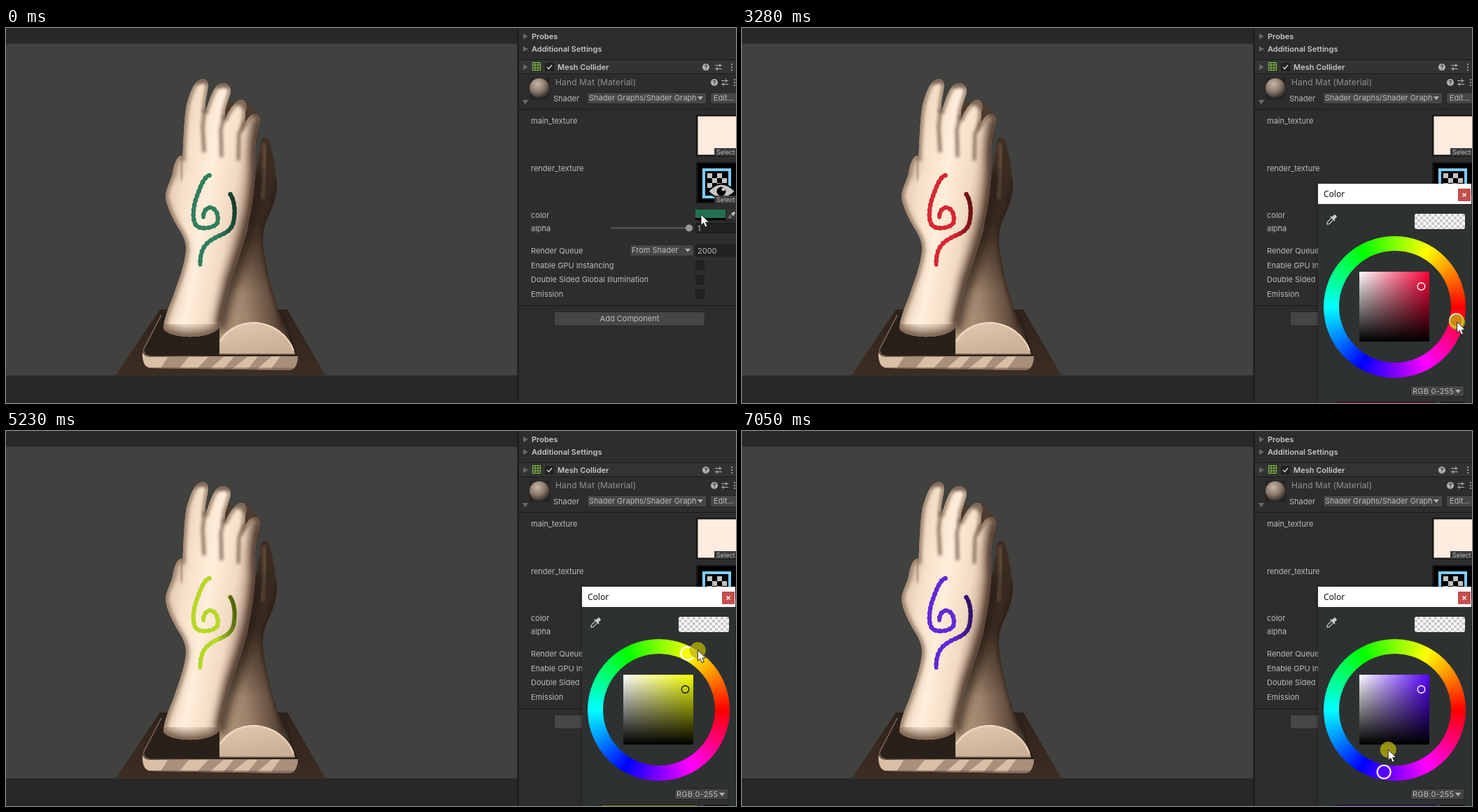
Recreate the animation shown at these times as an HTML page. Size 1043x537 px, loop 8000 ms.

```html
<!DOCTYPE html>
<html lang="en">
<head>
<meta charset="utf-8">
<title>Material colour picker</title>
<style>
html, body { margin: 0; width: 100%; height: 100%; overflow: hidden; background: #282828; }
body { position: relative; }
svg { position: absolute; left: 0; top: 0; display: block; }
text { font: 11px Inter, Roboto, sans-serif; fill: #bcbcbc; white-space: pre; }
.bold { font-weight: 600; fill: #c6c6c6; }
.small { font-size: 9px; }
.field { fill: #222; stroke: #191919; }
.drop { fill: #464646; stroke: #262626; }
.icon { fill: none; stroke: #b4b4b4; stroke-width: 1.2; }
#pop { position: absolute; left: 0; top: 0; width: 1043px; height: 537px; transform-origin: 933px 380px; }
#pop div { position: absolute; }
.panel { left: 823px; top: 223px; width: 219px; height: 330px; background: #2e3131; box-shadow: 0 1px 7px rgba(0,0,0,.3); }
.title { left: 823px; top: 223px; width: 219px; height: 29px; background: #fff; }
.wheel { left: 831px; top: 297.5px; width: 203px; height: 203px; border-radius: 50%;
  background: conic-gradient(from 90deg, #f00, #f0f, #00f, #0ff, #0f0, #ff0, #f00); }
.hole { left: 852.5px; top: 319px; width: 160px; height: 160px; border-radius: 50%; background: #2e3131; }
.square { left: 882px; top: 349px; width: 100px; height: 100px;
  background: linear-gradient(to top, #000, rgba(0,0,0,0)), linear-gradient(to right, #fff, rgba(255,255,255,0)), var(--hue); }
.swatch { left: 961px; top: 266px; width: 72px; height: 22px; border-radius: 3px;
  background: repeating-conic-gradient(#c9c9c9 0 25%, #fff 0 50%) 0 0 / 8px 8px; }
</style>
</head>
<body>
<svg width="1043" height="537" viewBox="0 0 1043 537">
  <defs>
    <path id="front" d="M249 183C243 186 240 196 238 208C236 218 229 228 228 240C229 256 238 272 246 286C253 297 258 306 257 320C255 340 247 360 241 378C235 396 226 412 225 430C228 438 248 443 268 442C286 441 300 436 306 428C306 410 314 385 322 358C329 334 340 310 345 285C351 258 355 235 356 205C355 185 356 165 358 152C361 142 364 134 362 128C359 122 351 123 347 128L341 136L342 120C345 112 343 105 338 103C332 102 327 108 322 114C318 120 315 126 312 132L313 118C316 106 321 96 321 88C319 80 312 78 306 80C298 83 295 92 291 102L284 122L285 108C286 96 290 86 288 78C286 72 279 72 274 76C266 82 262 96 258 110C255 125 254 150 253 170L252 190C253 185 251 182 249 183Z"/>
    <path id="back" d="M364 163C366 156 373 156 376 162C381 175 384 200 387 220C388 240 381 256 374 272C366 290 366 305 369 325C373 350 380 375 388 402C394 415 408 445 413 467H305V430C310 390 330 340 345 290L356 210C360 195 360 185 363 176Z"/>
    <path id="side" d="M195 464Q194 486 207 487L404 490Q416 490 417 470L205 471Q197 470 195 464Z"/>
    <clipPath id="inFront"><use href="#front"/></clipPath>
    <clipPath id="inBack"><use href="#back"/></clipPath>
    <clipPath id="inSide"><use href="#side"/></clipPath>
    <filter id="soft" x="-50%" y="-50%" width="200%" height="200%"><feGaussianBlur stdDeviation="6"/></filter>
    <filter id="fine" x="-50%" y="-50%" width="200%" height="200%"><feGaussianBlur stdDeviation="2"/></filter>
    <linearGradient id="skin" gradientUnits="userSpaceOnUse" x1="228" x2="356" y1="240" y2="262">
      <stop stop-color="#e3cab2"/><stop offset=".2" stop-color="#f7e1cb"/><stop offset=".45" stop-color="#ffeeda"/>
      <stop offset=".72" stop-color="#f2dac3"/><stop offset="1" stop-color="#b0937b"/>
    </linearGradient>
    <linearGradient id="arm" gradientUnits="userSpaceOnUse" x1="305" x2="396" y1="400" y2="388">
      <stop stop-color="#b5997f"/><stop offset=".4" stop-color="#9f846d"/><stop offset=".75" stop-color="#6c5544"/><stop offset="1" stop-color="#3f3026"/>
    </linearGradient>
    <linearGradient id="dusk" x2="0" y2="1">
      <stop stop-color="#3c2d22" stop-opacity=".85"/><stop offset=".4" stop-color="#35271d" stop-opacity=".85"/><stop offset=".72" stop-color="#35271d" stop-opacity="0"/>
    </linearGradient>
    <linearGradient id="face" x2=".4" y2="1"><stop stop-color="#e3c9b1"/><stop offset="1" stop-color="#cbb097"/></linearGradient>
    <linearGradient id="plinth" x2="0" y2="1"><stop stop-color="#2f231c"/><stop offset="1" stop-color="#3d2d23"/></linearGradient>
    <linearGradient id="dim" gradientUnits="userSpaceOnUse" x1="296" x2="330" y1="270" y2="264">
      <stop stop-opacity="0"/><stop offset="1" stop-opacity=".34"/>
    </linearGradient>
    <radialGradient id="ball" cx=".4" cy=".3" r=".75"><stop stop-color="#c9b5a4"/><stop offset=".5" stop-color="#8e7d70"/><stop offset="1" stop-color="#2c2622"/></radialGradient>
    <g id="tools">
      <circle r="5" fill="#b4b4b4"/><path d="M-1.6-1.4Q-1.4-3 0-3T1.6-1.4Q1.5-.6 0 .4V1M0 2.2V3.2" fill="none" stroke="#2d2d2d" stroke-width="1.2"/>
    </g>
    <path id="sliders" class="icon" d="M-5-2.5H5M-5 2.5H5M2-5V0M-2 0V5"/>
    <path id="dots" d="M0-4v.1M0 0v.1M0 4v.1" stroke="#c4c4c4" stroke-width="2" stroke-linecap="round"/>
    <path id="fold" d="M-3-4L4 0L-3 4Z" fill="#696969"/>
    <path id="caret" d="M-4-2H4L0 3Z" fill="#b0b0b0"/>
    <g id="dropper" transform="rotate(45)">
      <path d="M-2.6-9Q0-11 2.6-9V-4H4.5V-1.8H-4.5V-4H-2.6Z" fill="#c8cccc"/><path d="M-2-1V6L0 9L2 6V-1" fill="none" stroke="#c8cccc" stroke-width="1.3"/>
    </g>
  </defs>

  <rect width="731" height="537" fill="#282828"/>
  <rect y="22.500" width="731" height="475" fill="#41413f"/>

  <!-- stand -->
  <path d="M220 403H402L456 497H157Z" fill="url(#plinth)"/>
  <path d="M222 410Q224 406 232 406H388Q395 406 398 412L417 470H205Q194 469 196 462Z" fill="#2a201a"/>
  <path d="M222 411L197 459Q195 469 206 470L416 471" fill="none" stroke="#8e7765" stroke-width="1.2"/>
  <use href="#side" fill="#d9bfa6"/>
  <g clip-path="url(#inSide)">
    <path d="M232 470L220 489H246L262 470ZM290 470L272 489H290L312 470ZM326 470L310 489H322L346 470ZM360 470L345 489H358L380 470ZM392 470L378 489H420V470Z" fill="#846b59" opacity=".55"/>
    <path d="M195 488L418 491" stroke="#5d4a3c" stroke-width="5" filter="url(#fine)"/>
  </g>

  <!-- far hand -->
  <path d="M306 110Q314 101 328 109L342 103L363 128L358 165L318 160Z" fill="#4d3b2e"/>
  <use href="#back" fill="url(#arm)"/>
  <g clip-path="url(#inBack)">
    <rect x="300" y="155" width="115" height="312" fill="url(#dusk)"/>
    <path d="M368 165C372 185 368 225 366 245" fill="none" stroke="#80664f" stroke-width="6" opacity=".55" filter="url(#fine)"/>
    <path d="M358 205C354 255 340 310 325 355Q310 395 305 432" fill="none" stroke="#241911" stroke-width="18" opacity=".65" filter="url(#soft)"/>
    <path d="M387 220Q384 255 369 282Q364 310 380 370L398 428" fill="none" stroke="#2b1f17" stroke-width="7" opacity=".65" filter="url(#fine)"/>
  </g>
  <path d="M305 467V447C315 430 335 421 355 421C385 423 405 440 413 467Z" fill="url(#face)"/>
  <path d="M306 449C317 431 336 422 355 422C383 424 403 440 411 462" fill="none" stroke="#f0d9c3" stroke-width="2"/>
  <path d="M305 467H413" stroke="#806957" stroke-width="1.500"/>

  <!-- near hand -->
  <use href="#front" fill="url(#skin)"/>
  <g clip-path="url(#inFront)" fill="none">
    <use href="#front" stroke="#806550" stroke-width="9" opacity=".65" filter="url(#fine)"/>
    <path d="M362 128Q354 165 357 205Q354 255 345 285Q337 318 322 358L306 428" stroke="#3f2c20" stroke-width="19" opacity=".75" filter="url(#soft)"/>
    <path d="M249 183Q248 202 239 215M226 245Q242 290 257 312Q255 350 226 428" stroke="#9a7c65" stroke-width="10" opacity=".4" filter="url(#soft)"/>
    <path d="M284 116L281 140L283 178M312 125L307 146L308 185M341 134L333 152L332 190" stroke="#6e5543" stroke-width="5" opacity=".75" filter="url(#fine)"/>
    <path d="M268 74H290M300 80H324M329 102L364 127" stroke="#604a3b" stroke-width="12" opacity=".6" filter="url(#fine)"/>
    <path d="M252 180L250 218" stroke="#8d715b" stroke-width="4" opacity=".6" filter="url(#fine)"/>
    <path d="M222 431Q264 450 310 430" stroke="#674f3e" stroke-width="21" opacity=".65" filter="url(#soft)"/>
  </g>
  <g id="swirl" fill="none" stroke-linecap="round" stroke-linejoin="round">
    <path id="curl" d="M290.500 211C282 213 276 232 271 246C267 260 266 276 272 283C279 289 297 287 302 279C305 267 299 257 291 257C284 259 282 264 282 271" stroke-width="5.600"/>
    <path id="tail" d="M320.500 238C327 248 328 264 325 278C321 294 307 295 296 302C283 309 277 320 277.500 339" stroke-width="5.600"/>
    <use href="#curl" stroke-dasharray="0 7" style="stroke-width:6.600px"/>
    <path d="M290.500 211C282 213 276 232 271 246C267 260 266 276 272 283C279 289 297 287 302 279C305 267 299 257 291 257C284 259 282 264 282 271M320.500 238C327 248 328 264 325 278C321 294 307 295 296 302C283 309 277 320 277.500 339" stroke-width="6.700" stroke-dasharray="0 7"/>
    <use href="#tail" stroke="url(#dim)"/>
    <path d="M320.500 238C327 248 328 264 325 278C321 294 307 295 296 302" stroke="url(#dim)" stroke-width="6"/>
  </g>

  <!-- inspector -->
  <rect x="731" width="312" height="537" fill="#2d2d2d"/>
  <rect x="730.500" width="2" height="537" fill="#191919"/>
  <rect x="733" y="46" width="310" height="19" fill="#333"/>
  <path d="M733 45.500H1043M733 65.500H1043M733 116.500H1043M733 397.500H1043" stroke="#1b1b1b"/>
  <use href="#fold" x="742" y="12"/><use href="#fold" x="742" y="30"/><use href="#fold" x="742" y="56"/>
  <use href="#fold" transform="translate(742 106) rotate(90)"/>
  <text class="bold" x="751" y="16">Probes</text>
  <text class="bold" x="751" y="34">Additional Settings</text>
  <path d="M752.500 49.500H763.500V60.500H752.500ZM756 49.500V60.500M760 49.500V60.500M752.500 53H763.500M752.500 57H763.500" fill="none" stroke="#82c83c"/>
  <rect class="field" x="770.500" y="50.500" width="12" height="11" rx="2"/>
  <path d="M773 56L775.500 58.500L780 53" fill="none" stroke="#d0d0d0" stroke-width="1.500"/>
  <text class="bold" x="788" y="60">Mesh Collider</text>
  <use href="#tools" x="1000" y="56"/><use href="#sliders" x="1018" y="56"/><use href="#dots" x="1037" y="56"/>
  <use href="#tools" x="1012" y="78"/><use href="#sliders" x="1027" y="78"/><use href="#dots" x="1041" y="78"/>
  <rect x="748" y="71" width="29" height="31" fill="#262626"/>
  <circle cx="762" cy="86" r="14" fill="url(#ball)"/>
  <text x="785" y="82" style="font-size:12px;fill:#929292;letter-spacing:.13px">Hand Mat (Material)</text>
  <text x="782" y="105">Shader</text>
  <rect class="drop" x="830.500" y="92.500" width="170" height="16" rx="2"/>
  <text x="833" y="104">Shader Graphs/Shader Graph</text><use href="#caret" x="992" y="100"/>
  <rect class="drop" x="1006.500" y="92.500" width="40" height="16" rx="2"/><text x="1011" y="104">Edit...</text>

  <text x="750" y="137">main_texture</text>
  <rect x="986" y="124" width="57" height="60" fill="#171717"/><rect x="988.500" y="126.500" width="55" height="55" fill="#fdecdf"/>
  <text x="750" y="205">render_texture</text>
  <rect x="986" y="192" width="57" height="59" fill="#161616"/><rect x="988.500" y="194" width="55" height="55" fill="#000"/>
  <rect x="997" y="203" width="37" height="39" fill="none" stroke="#7fcdf5" stroke-width="4"/>
  <path d="M1002 208h7v7h-7zM1016 208h7v7h-7zM1009 215h7v7h-7zM1023 215h7v7h-7zM1002 222h7v7h-7zM1016 222h7v7h-7z" fill="#c4c4c4"/>
  <path d="M1003 234Q1022 213 1042 234Q1022 253 1003 234Z" fill="#c4c4c4" stroke="#000" stroke-width="2"/>
  <circle cx="1022" cy="234" r="6.500" fill="#000"/><circle cx="1025" cy="231" r="2.500" fill="#c4c4c4"/>
  <path d="M1012 172h31v11h-31zM1012 240h31v11h-31z" fill="#3b3b3b"/>
  <text class="small" x="1015" y="181">Select</text><text class="small" x="1015" y="249">Select</text>

  <text x="750" y="272">color</text>
  <rect x="985" y="260" width="58" height="16" fill="#1d1d1d"/><rect x="985" y="260" width="43" height="12" fill="#217150"/><rect x="985" y="272" width="43" height="3" fill="#000"/>
  <rect x="1029" y="260" width="14" height="15" fill="#333"/><use href="#dropper" transform="translate(1037 268) scale(.6)"/>
  <text x="750" y="291">alpha</text>
  <path d="M864 286.500H976" stroke="#5e5e5e" stroke-width="2"/><circle cx="976" cy="286.500" r="5" fill="#999"/>
  <rect class="field" x="985.500" y="279.500" width="60" height="14" rx="2"/><text x="988" y="291">1</text>
  <text x="750" y="323">Render Queue</text>
  <rect class="drop" x="891.500" y="310.500" width="91" height="16" rx="2"/><text x="894" y="322">From Shader</text><use href="#caret" x="974" y="318"/>
  <rect class="field" x="985.500" y="310.500" width="60" height="16" rx="2"/><text x="988" y="323">2000</text>
  <text x="750" y="344">Enable GPU Instancing</text>
  <text x="750" y="364">Double Sided Global Illumination</text>
  <text x="750" y="385">Emission</text>
  <rect class="field" x="985.500" y="333.500" width="12" height="12" rx="2"/><rect class="field" x="985.500" y="354.500" width="12" height="12" rx="2"/><rect class="field" x="985.500" y="374.500" width="12" height="12" rx="2"/>
  <rect class="drop" x="783.500" y="406.500" width="215" height="20" rx="2"/><text x="891" y="420" text-anchor="middle">Add Component</text>
</svg>

<div id="pop">
  <div class="panel"></div><div class="title"></div>
  <div class="wheel"></div><div class="hole"></div><div class="square"></div><div class="swatch"></div>
  <svg width="1043" height="537" viewBox="0 0 1043 537">
    <text x="831" y="242" style="font:12px 'Noto Sans','Open Sans',sans-serif;fill:#111">Color</text>
    <rect x="1023" y="230" width="18" height="18" fill="#c64e4e"/>
    <path d="M1029.500 236.500L1034.500 241.500M1034.500 236.500L1029.500 241.500" stroke="#fff" stroke-width="1.400"/>
    <use href="#dropper" transform="translate(842 275) scale(.95)"/>
    <rect class="drop" x="955.500" y="512.500" width="76" height="15" rx="2"/>
    <text x="958" y="524" style="letter-spacing:.25px">RGB 0-255</text><use href="#caret" x="1023" y="520"/>
    <rect x="848" y="535" width="142" height="2" fill="#151515"/><rect id="strip" x="850" y="536" width="138" height="1" opacity=".6"/>
    <rect x="998" y="535" width="35" height="2" fill="#1b1b1b"/>
    <circle id="hueDot" r="9.500" stroke="#fff" stroke-width="2.200"/>
    <circle id="toneDot" r="5.300" fill="none" stroke-width="1.400"/>
  </svg>
</div>

<svg width="1043" height="537" viewBox="0 0 1043 537">
  <g id="mouse">
    <circle id="halo" r="11.500" fill="#beb40a"/>
    <path d="M0 0V15.500L3.600 12.200L6 18L9 16.700L6.600 11.200H11.500Z" fill="#fff" stroke="#111" stroke-width=".9"/>
  </g>
</svg>

<script>
const el = id => document.getElementById(id);
const LOOP = 8000, PRESS = 950, GRAB = 2850, REST = 7050;
const CX = 932.3, CY = 399, RING = 90.5;

// Spans in which the screen updates: start, end, number of updates.
const spans = [[70, 190, 3], [640, 1340, 11], [1770, 1900, 2], [2400, 3160, 13], [3210, 3990, 13],
  [4060, 4840, 13], [4900, 5680, 13], [5750, 6530, 13], [6600, 7050, 8]];

// Free pointer moves: time, x, y.
const moves = [[590, 993, 267], [PRESS, 955, 404], [1340, 971, 370], [2340, 971, 370], [2400, 977, 367], [GRAB, 1013, 361]];
// Wheel drag: time, hue, pointer angle, pointer radius.
const drag = [[GRAB, 25, 25, 89], [3180, 0, -1, 87], [3800, -83, -85, 120], [4580, -208, -213, 98],
  [5230, -298, -304, 102], [5680, -340, -343, 95], [6530, -396.5, -399, 77], [REST, -459.6, -459, 58]];
// Picked tone: time, saturation, value.
const tones = [[PRESS, .71, .44], [1340, .88, .79]];

function snap(t) {
  const s = spans.filter(s => s[0] <= t).pop();
  if (!s) return 0;
  const [a, b, n] = s, step = (b - a) / (n - 1);
  return a + step * Math.min(n - 1, Math.floor((t - a) / step + .1));
}

function at(keys, t) {
  if (t <= keys[0][0]) return keys[0].slice(1);
  const i = keys.findIndex(k => k[0] > t);
  if (i < 0) return keys[keys.length - 1].slice(1);
  const p = keys[i - 1], q = keys[i], k = (t - p[0]) / (q[0] - p[0]);
  return p.slice(1).map((v, j) => v + (q[j + 1] - v) * k);
}

const hueAt = t => t < GRAB ? 155 : at(drag, t)[0];

function hsv(h, s, v) {
  const part = n => {
    const k = (((n + h / 60) % 6) + 6) % 6;
    return 255 * v * (1 - s * Math.max(0, Math.min(k, 4 - k, 1)));
  };
  return [part(5), part(3), part(1)];
}

const css = c => `rgb(${c.map(v => Math.round(Math.min(255, v))).join(',')})`;

function polar(angle, r) {
  const a = angle * Math.PI / 180;
  return [CX + r * Math.cos(a), CY - r * Math.sin(a)];
}

const place = (node, [x, y]) => node.setAttribute('transform', `translate(${x.toFixed(2)} ${y.toFixed(2)})`);

function draw(t) {
  const hue = hueAt(t), [s, v] = at(tones, t), pure = css(hsv(hue, 1, 1)), color = hsv(hue, s, v);
  const pop = el('pop'), open = Math.min(1, (t - 10) / 180);
  pop.style.visibility = t < 70 ? 'hidden' : 'visible';
  pop.style.opacity = open;
  pop.style.transform = `scale(${.9 + .1 * open})`;
  pop.style.setProperty('--hue', pure);

  place(el('hueDot'), polar(hue, RING));
  el('hueDot').style.fill = pure;
  place(el('toneDot'), [882.5 + 100 * s, 449 - 100 * v]);
  const light = .3 * color[0] + .59 * color[1] + .11 * color[2];
  el('toneDot').style.stroke = light > 95 || t < GRAB ? '#111' : '#fff';
  el('strip').style.fill = css(color);

  // The painted mark trails the picker by one update.
  const late = t < REST ? t - 65 : t;
  el('swirl').style.stroke = css(hsv(hueAt(late), ...at(tones, late)).map(c => c + 15));

  let tip = at(moves, t);
  if (t >= GRAB) tip = polar(...at(drag, t).slice(1));
  place(el('mouse'), tip);
  const down = t >= GRAB || (t >= PRESS && t < 1770);
  el('halo').style.opacity = down ? .75 : t >= 1770 && t < 1900 ? .4 : 0;
}

function tick() {
  draw(snap(performance.now() % LOOP));
  requestAnimationFrame(tick);
}
tick();
</script>
</body>
</html>
```
